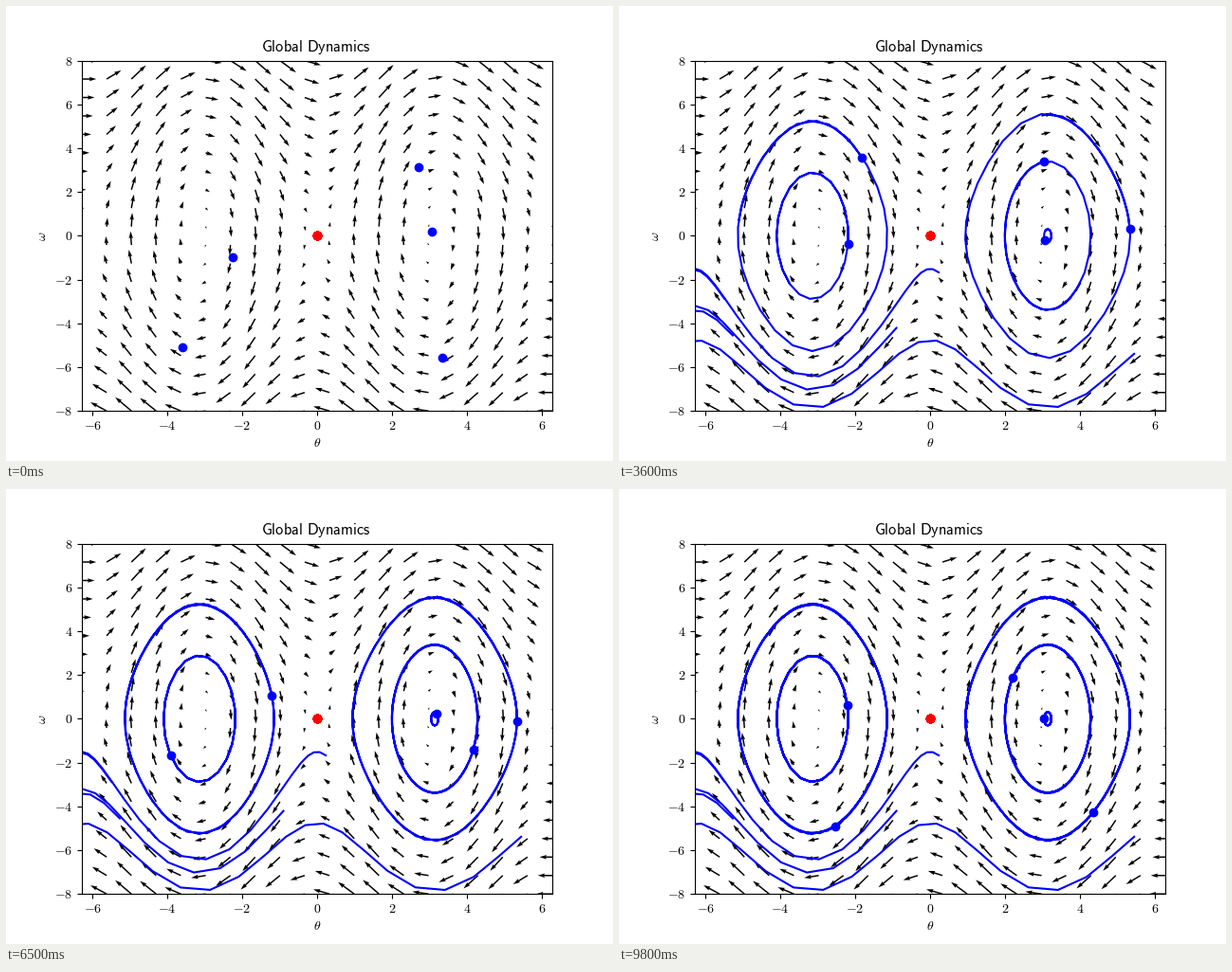
Write a matplotlib script that moves like this. It is 640 by 480 pixels and loops after 9900 ms.

```python
import numpy as np
import matplotlib.pyplot as plt
from matplotlib.animation import FuncAnimation

plt.rcParams.update({
    "font.family": "Liberation Serif",
    "mathtext.fontset": "cm",
})

GRAVITY = 9.8
ARROW_GRAVITY = 7  # gentler pull for the arrow field
SAMPLES = 100
FRAMES = 99
SUBSTEPS = 40

# Release points: five swings around a well, then five full spins
THETA = [-3.76, -5.11, 4.00, 3.21, 3.075, 0.23, -5.49, -5.27, -0.90, 5.45]
OMEGA = [-2.17, 0.73, -2.19, 5.58, 0.22, -1.67, -2.88, -4.55, -4.21, -5.39]


def flow(state, gravity=GRAVITY):
    """Pendulum with theta = 0 at the upright position."""
    theta, omega = state
    return np.array([omega, gravity * np.sin(theta)])


def rk4(state, h):
    k1 = flow(state)
    k2 = flow(state + h / 2 * k1)
    k3 = flow(state + h / 2 * k2)
    k4 = flow(state + h * k3)
    return state + h / 6 * (k1 + 2 * k2 + 2 * k3 + k4)


def simulate(state):
    h = 10 / (SAMPLES - 1) / SUBSTEPS
    path = [state]
    for _ in range(SAMPLES - 1):
        for _ in range(SUBSTEPS):
            state = rk4(state, h)
        path.append(state)
    return np.array(path)


def label(value):
    sign = "-" if value < 0 else ""
    return rf"${sign}\mathrm{{{abs(value)}}}$"


path = simulate(np.array([THETA, OMEGA]))

fig, ax = plt.subplots(figsize=(6.4, 4.8), dpi=100)
ax.set_xlim(-2 * np.pi, 2 * np.pi)
ax.set_ylim(-8, 8)
xticks = range(-6, 7, 2)
yticks = range(-8, 9, 2)
ax.set_xticks(xticks, [label(v) for v in xticks])
ax.set_yticks(yticks, [label(v) for v in yticks])
ax.set_xlabel(r"$\theta$", labelpad=3.3)
ax.set_ylabel(r"$\omega$")
ax.set_title(r"$\mathsf{Global\ Dynamics}$", fontsize=11.8, x=0.498, pad=6.6)

grid = np.meshgrid(np.linspace(-2 * np.pi, 2 * np.pi, 20),
                   np.linspace(-8, 8, 20))
ax.quiver(*grid, *flow(grid, ARROW_GRAVITY))

trails = [ax.plot([], [], "b-", lw=1.5)[0] for _ in THETA]
bobs = [ax.plot([], [], "bo", ms=6)[0] for _ in THETA]
# One fixed point marker per pendulum, stacked
rest = np.zeros(len(THETA))
ax.plot(rest, rest, "ro", ms=6)


def update(i):
    # At i = 0 the trail is empty and the bob sits at the last sample
    for n, (trail, bob) in enumerate(zip(trails, bobs)):
        trail.set_data(path[:i, 0, n], path[:i, 1, n])
        bob.set_data([path[i - 1, 0, n]], [path[i - 1, 1, n]])
    return trails + bobs


anim = FuncAnimation(fig, update, frames=FRAMES, interval=100,
                     repeat=True, repeat_delay=0)
plt.show()
```
